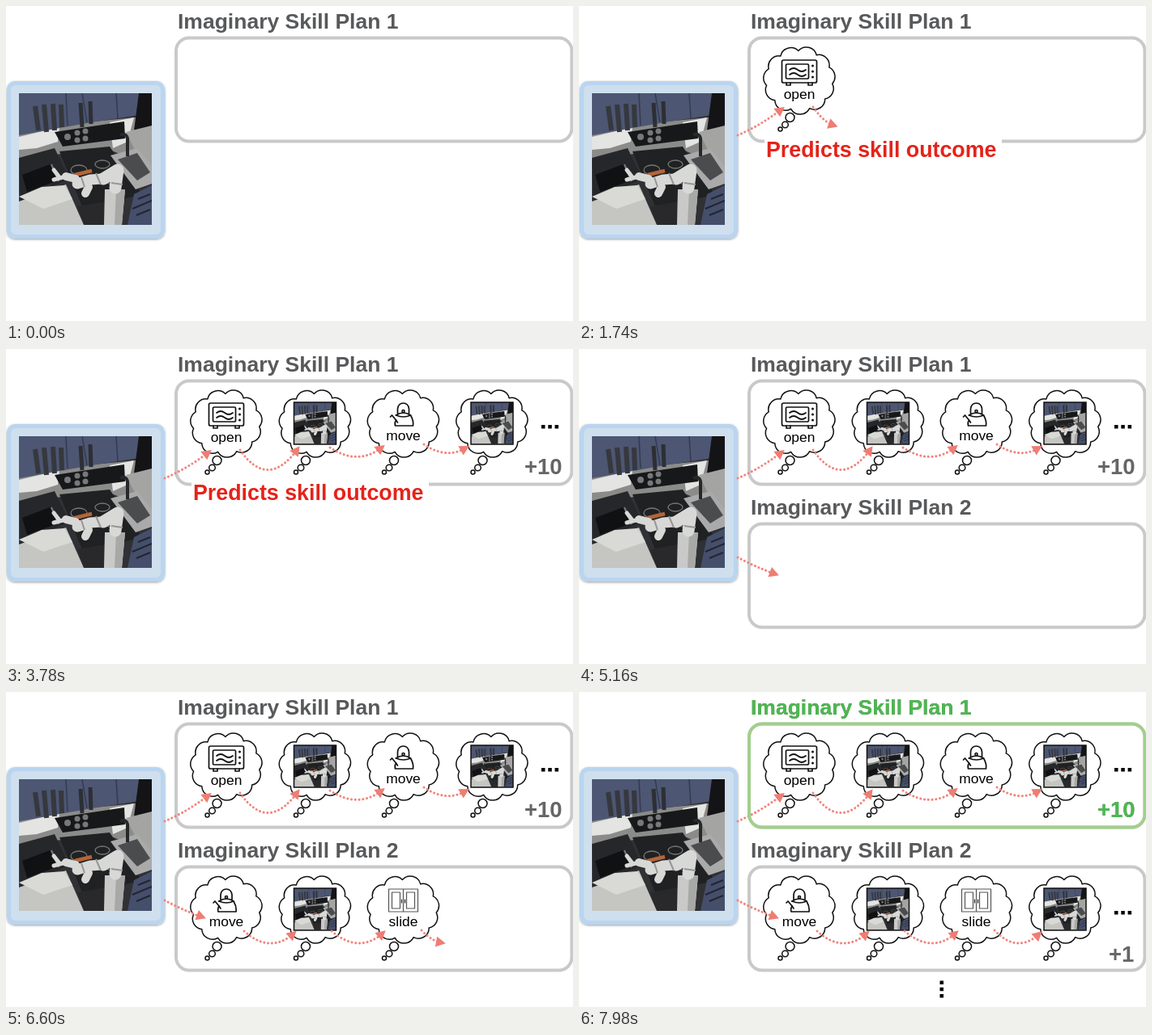
These frames come from a looping animation (700 px wide and 390 px high, 8 s). An HTML page:

```html
<!DOCTYPE html>
<html lang="en">
<head>
<meta charset="utf-8">
<title>Imaginary Skill Plans</title>
<style>
  html, body { margin: 0; width: 100%; height: 100%; overflow: hidden; background: #fff; }
  svg { display: block; width: 700px; height: 390px; font-family: "Liberation Sans", Arial, sans-serif; }
  .title { font-weight: bold; font-size: 26.5px; }
  .claim { font-weight: bold; font-size: 26.8px; fill: #e4231a; }
  .score { font-weight: bold; font-size: 27.5px; }
  .word { font-size: 17.4px; text-anchor: middle; }
  .ink { fill: none; stroke: #111; stroke-width: 1.7; stroke-linejoin: round; stroke-linecap: round; }
  .cloud { fill: #fff; stroke: #111; stroke-width: 1.5; stroke-linejoin: round; }
  .trail { fill: none; stroke: #f0857d; stroke-width: 3; stroke-linecap: round; }
  .head { fill: #ef7d74; }
</style>
</head>
<body>
<svg id="stage" viewBox="0 0 700 390">
  <defs>
    <filter id="shadow" x="-10%" y="-10%" width="120%" height="120%">
      <feDropShadow dx="0" dy="1" stdDeviation="1.8" flood-opacity=".4"/>
    </filter>
    <clipPath id="photoEdge"><rect width="164" height="163"/></clipPath>
    <g id="kitchen" clip-path="url(#photoEdge)">
      <rect width="164" height="163" fill="#303135"/>
      <path d="M0 44L164 28V92L112 70 60 74 0 82Z" fill="#8b8b89"/>
      <path d="M0 54L50 42 48 60 22 68 0 70ZM112 36L142 30 134 60 116 68Z" fill="#e4e4e2"/>
      <path d="M0 0H148V27L90 36 0 52Z" fill="#4d5672"/>
      <path d="M78 0L84 36M58 0L60 40M120 0L122 31" stroke="#343b50" stroke-width="1.5"/>
      <path d="M148 0H164V42L142 46Z" fill="#141416"/>
      <path d="M20 16L24 46M31 14L34 48M42 13L44 46M52 14L53 42" stroke="#36383e" stroke-width="6"/>
      <path d="M76 12L78 42M88 10L89 38" stroke="#2d2f34" stroke-width="5"/>
      <path d="M44 48L130 35 131 56 54 66Z" fill="#17181a"/>
      <g fill="#77787a">
        <circle cx="72" cy="49" r="3.5"/><circle cx="82" cy="47" r="3.5"/>
        <circle cx="72" cy="58" r="3.5"/><circle cx="82" cy="56" r="3.5"/><circle cx="60" cy="54" r="4"/>
      </g>
      <path d="M132 48L164 40V94L142 68Z" fill="#a4a4a2"/>
      <path d="M50 72L112 66 152 126 78 140Z" fill="#202123"/>
      <g fill="none" stroke="#777" stroke-width="1.3">
        <ellipse cx="74" cy="95" rx="10" ry="6"/><ellipse cx="103" cy="88" rx="9" ry="5"/>
        <ellipse cx="116" cy="108" rx="9" ry="5"/>
      </g>
      <path d="M113 77L146 68 164 90V112L144 119Z" fill="#aaa"/>
      <path d="M122 82L146 74 162 98 146 108Z" fill="#4b4c4e"/>
      <path d="M134 78V56Q132 48 125 52" fill="none" stroke="#27282b" stroke-width="4"/>
      <path d="M142 125L164 114V163H134Z" fill="#454f6b"/>
      <path d="M140 143L164 133M147 131L162 125M145 151L162 144" stroke="#22252e" stroke-width="2"/>
      <path d="M72 140L108 134V163H80Z" fill="#29292b"/>
      <path d="M0 80L44 68 62 106 2 134Z" fill="#26272a"/>
      <path d="M4 101L38 88 48 108 10 122Z" fill="#101113"/>
      <path d="M40 88L49 109" stroke="#777" stroke-width="2"/>
      <path d="M0 134L58 113 80 163H0Z" fill="#c5c5c1"/>
      <path d="M0 128L28 116 56 114 66 131 30 143Z" fill="#d9d9d5"/>
      <path d="M69 101L90 96" stroke="#b46539" stroke-width="4.5"/>
      <path d="M106 119H131L127 163H105Z" fill="#c9c9c8"/>
      <path d="M120 119H131L127 163H118Z" fill="#a8a8a7"/>
      <g fill="none" stroke="#d8d8d7" stroke-linecap="round" stroke-linejoin="round">
        <path d="M119 117L122 95 104 106" stroke-width="15"/>
        <path d="M102 106L88 107 72 112" stroke-width="13"/>
        <path d="M86 116L82 124M70 106L58 103" stroke-width="10"/>
        <path d="M58 103L43 107M50 104L43 95" stroke-width="5"/>
      </g>
      <path d="M95 99L101 113M114 111L128 113M77 104L81 116" stroke="#969696" stroke-width="2"/>
    </g>
    <g id="microwave" class="ink">
      <rect x="-21.5" y="-25" width="43" height="28" rx="2"/>
      <rect x="-16.500" y="-20" width="28" height="18" rx="1.500"/>
      <path d="M-12 -13q5 -4 10 0t10 0M-12 -7q5 -4 10 0t10 0M-16 3v3h5v-3M11 3v3h5v-3"/>
      <path d="M16.500 -18v.1M16.500 -11v.1M16.500 -4v.1" stroke-width="3"/>
    </g>
    <g id="kettle" class="ink">
      <path d="M-9 -10Q0 -16 9 -10Q13 -3 12 3H-10Q-11 -1 -9 -4L-14 -10 -16 -8"/>
      <path d="M-7 -12V-18Q-6 -25 0 -25T7 -18V-12M-9 -10Q0 -6 9 -10M-9 -4L-7 -1"/>
      <circle cy="-15" r="1.500"/>
    </g>
    <g id="cabinet" class="ink" style="stroke:#555;stroke-width:1.2">
      <path d="M-18 -25H18V3H-18ZM0 -25V3M-14 -21H-4V-1H-14ZM4 -21H14V-1H4Z"/>
      <path d="M-2 -12v4M2 -12v4" stroke="#222"/>
    </g>
    <g id="thumb">
      <use href="#kitchen" transform="translate(-26 -26) scale(.317)"/>
      <rect x="-26" y="-26" width="52" height="52" fill="none" stroke="#111" stroke-width="1.500"/>
    </g>
    <g id="dots"><path d="M0 0h4.500v4.500h-4.500zM8.300 0h4.500v4.500h-4.500zM16.600 0h4.500v4.500h-4.500z"/></g>
  </defs>

  <rect x="1" y="93" width="195" height="195" rx="10" fill="#b9d5f0" filter="url(#shadow)"/>
  <rect x="6" y="98" width="185" height="185" rx="6" fill="#cfdfee"/>
  <use href="#kitchen" x="16" y="108"/>
  <g id="plans"></g>
</svg>
<script>
const LOOP = 8000;
const ROW = 177;
const GREY = { text: '#58595b', edge: '#c9c9c9' };
const GREEN = { text: '#4cb950', edge: '#a2cf8d' };
const columns = [272, 381.500, 490.500, 600];
const fades = [], arrows = [];

const clamp = v => Math.max(0, Math.min(1, v));
const plans = document.getElementById('plans');

function add(markup) {
  plans.insertAdjacentHTML('beforeend', `<g>${markup}</g>`);
  return plans.lastElementChild;
}

function fade(markup, start, length = 180, end = Infinity) {
  fades.push({ node: add(markup), start, length, end });
}

const panel = (row, color) =>
  `<rect x="210" y="${39.500 + row * ROW}" width="488.500" height="128" rx="16" fill="none" stroke="${color.edge}" stroke-width="4"/>
   <text class="title" x="212" y="${28 + row * ROW}" fill="${color.text}">Imaginary Skill Plan ${row + 1}</text>`;

const score = (x, y, value, color) =>
  `<text class="score" x="${x}" y="${y}" fill="${color}">${value}</text>`;

// Eleven arcs joined on an ellipse
function cloudPath() {
  const lobes = 11;
  let d = '';
  for (let i = 0; i <= lobes; i++) {
    const a = (i + .2) / lobes * Math.PI * 2;
    const x = 41 * Math.cos(a), y = 36.500 * Math.sin(a);
    d += `${i ? 'A13 13 0 0 1' : 'M'} ${x.toFixed(1)} ${y.toFixed(1)} `;
  }
  return d + 'Z';
}
const outline = cloudPath();

function cloud(col, row, icon, word, start) {
  const y = 92 + row * ROW;
  const label = word ? `<text class="word" y="${icon === 'microwave' ? 23 : 21}">${word}</text>` : '';
  fade(`<g transform="translate(${columns[col]} ${y})">
    <g class="cloud"><path d="${outline}"/><circle cx="-11.500" cy="46" r="5.500"/>
    <circle cx="-17.500" cy="55" r="3.800"/><circle cx="-23.500" cy="60.500" r="2.500"/></g>
    <use href="#${icon}"/>${label}</g>`, start);
}

function arrow(d, start, length = 260) {
  const node = add(`<path class="trail" d="${d}"/><path class="head" d="M1 0L-11 -6.500V6.500Z"/>`);
  const [line, head] = node.children;
  arrows.push({ node, line, head, start, length, total: line.getTotalLength() });
}

add(panel(0, GREY));
fade(panel(1, GREY), 4450, 250);
fade(`<rect x="229" y="162" width="293" height="30" fill="#fff"/>
  <text class="claim" x="231" y="186.500">Predicts skill outcome</text>`, 1450, 150, 4200);

cloud(0, 0, 'microwave', 'open', 1140);
cloud(1, 0, 'thumb', '', 1920);
cloud(2, 0, 'kettle', 'move', 2510);
cloud(3, 0, 'thumb', '', 3130);
cloud(0, 1, 'kettle', 'move', 5180);
cloud(1, 1, 'thumb', '', 5690);
cloud(2, 1, 'cabinet', 'slide', 6220);
cloud(3, 1, 'thumb', '', 6740);

fade('<use href="#dots" x="661" y="94"/>' + score(640, 154.500, '+10', '#666'), 3440, 200);
fade('<use href="#dots" x="661" y="271"/>' + score(654, 333.500, '+1', '#666'), 7000, 200);
fade('<use href="#dots" transform="translate(450 357.500) rotate(90)"/>', 7250, 200);

arrow('M196 160Q226 147 253 125.500', 850);
arrow('M289 125Q324 176 362 121', 1620, 290);
arrow('M400 122Q436 146 467 119.500', 2230);
arrow('M516 118Q545 138 571 120.500', 2870);
arrow('M196 258Q218 270 246 280', 4880);
arrow('M294 296Q327 326 358 296.500', 5410);
arrow('M402 296Q437 326 468 296', 5930);
arrow('M513 295Q542 326 571 297', 6470);

fade(panel(0, GREEN) + score(640, 154.500, '+10', GREEN.text), 7560, 300);

function drawArrow({ node, line, head, start, length, total }, t) {
  const p = clamp((t - start) / length);
  node.style.display = p > 0 ? '' : 'none';
  if (!p) return;
  const reach = p * total;
  const tip = line.getPointAtLength(reach);
  const back = line.getPointAtLength(Math.max(0, reach - 8));
  const angle = Math.atan2(tip.y - back.y, tip.x - back.x) * 180 / Math.PI;
  head.setAttribute('transform', `translate(${tip.x} ${tip.y}) rotate(${angle})`);
  const count = Math.max(0, Math.floor((reach - 9) / 4.800));
  line.style.strokeDasharray = count ? '.1 4.7 '.repeat(count) + '0 999' : '0 999';
}

function render() {
  const t = performance.now() % LOOP;
  for (const { node, start, length, end } of fades) {
    const alpha = clamp((t - start) / length) * (1 - clamp((t - end) / length));
    node.style.opacity = alpha;
  }
  arrows.forEach(a => drawArrow(a, t));
  requestAnimationFrame(render);
}
render();
</script>
</body>
</html>
```
